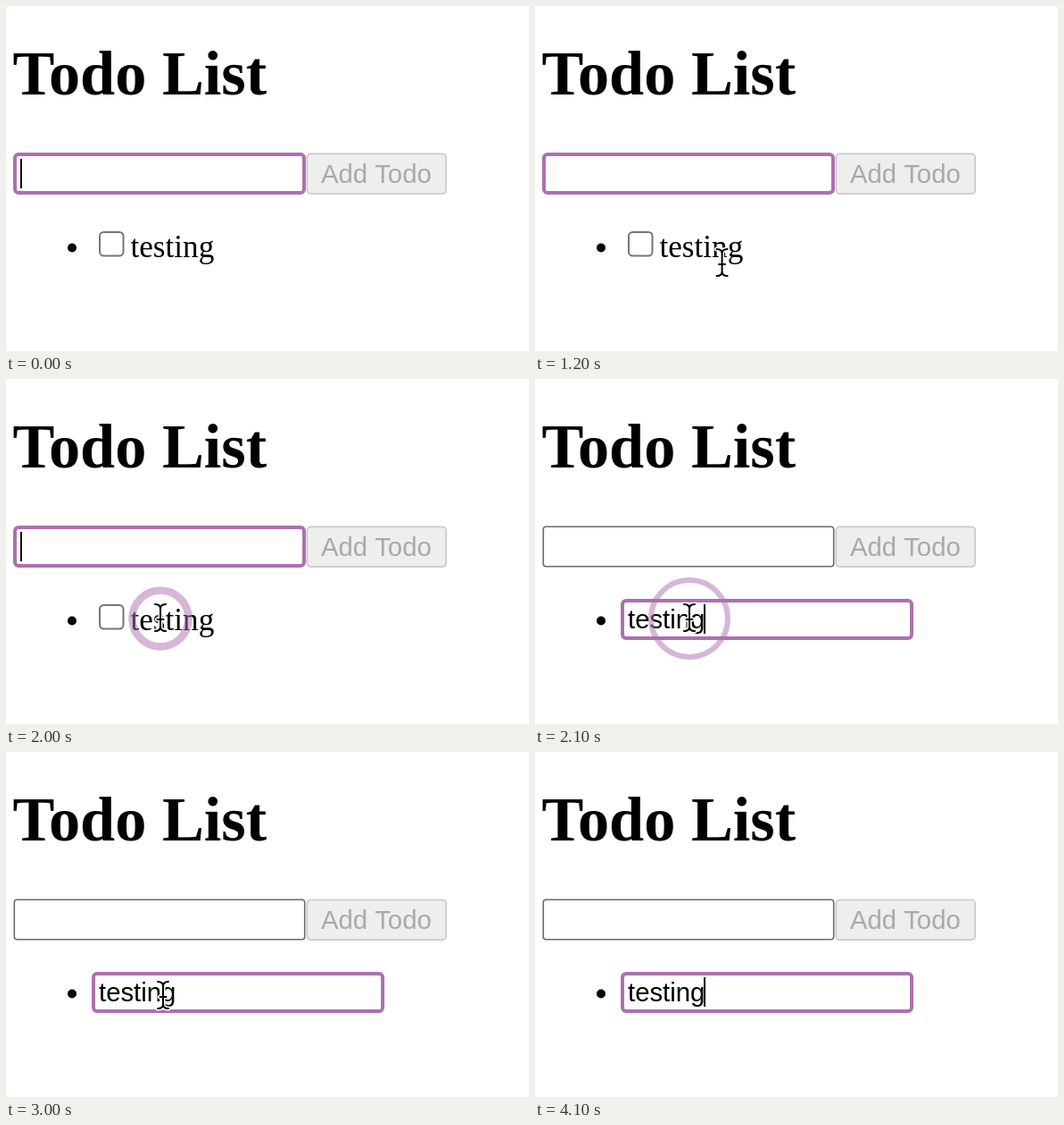
An HTML page with a canvas that plays this animation: 586x386 px, repeating every 4200 ms.

```html
<!DOCTYPE html>
<html lang="en">
<head>
<meta charset="utf-8">
<title>Todo List</title>
<style>
  html, body { margin: 0; width: 100%; height: 100%; overflow: hidden; background: #fff; }
  canvas { display: block; }
</style>
</head>
<body>
<canvas id="stage" width="586" height="386"></canvas>
<script>
const ctx = document.getElementById('stage').getContext('2d');
const LOOP = 4200, STEP = 100;
const ACCENT = '#ac70b0';
const SERIF = '"Liberation Serif", "Times New Roman", serif';
const SANS = '"Liberation Sans", Arial, sans-serif';
const REM = 35.15;
const HEADING = `bold ${REM * 2}px ${SERIF}`;
const BODY = `${REM}px ${SERIF}`;
const CONTROL = `${REM * 5 / 6}px ${SANS}`;
const REST = { x: 173, y: 267 };
const EDIT_AT = 2100;

function label(str, x, y, font, color = '#000') {
  ctx.font = font;
  ctx.fillStyle = color;
  ctx.fillText(str, x, y);
}

// Rounded box given by its outer edges, with the border drawn inside.
function box(x, y, w, h, r, line, border, fill = '#fff') {
  ctx.beginPath();
  ctx.roundRect(x + line / 2, y + line / 2, w - line, h - line, r);
  ctx.fillStyle = fill;
  ctx.fill();
  ctx.lineWidth = line;
  ctx.strokeStyle = border;
  ctx.stroke();
}

function field(x, y, w, h, focused) {
  if (focused) box(x, y, w, h, 4, 4, ACCENT);
  else box(x + 0.5, y + 0.5, w - 1, h - 1, 3, 1.6, '#6a6a6a');
}

function caret(x, y) {
  ctx.fillStyle = '#000';
  ctx.fillRect(x, y, 2, 33);
}

function dot(x, y, r) {
  ctx.beginPath();
  ctx.arc(x, y, r, 0, Math.PI * 2);
}

function outlined(path, x, y, outer, inner) {
  ctx.save();
  ctx.translate(x, y);
  ctx.lineJoin = ctx.lineCap = 'round';
  ctx.strokeStyle = '#fff';
  ctx.lineWidth = outer;
  ctx.stroke(path);
  if (inner) {
    ctx.strokeStyle = '#000';
    ctx.lineWidth = inner;
    ctx.stroke(path);
  } else {
    ctx.fillStyle = '#000';
    ctx.fill(path);
  }
  ctx.restore();
}

const beam = new Path2D('M-6-15Q0-15 0-10Q0-15 6-15M0-10V10M-6 15Q0 15 0 10Q0 15 6 15M-3.5 2H3.5');
const arrow = new Path2D('M0 0V25L6 19.5L10 29L14.5 27L10.5 18H18Z');

function pointer(t) {
  if (t < 900 || t >= 3400) return null;
  if (t < 1600) {
    const left = (1 - (t - 900) / 700) ** 2;
    return { x: REST.x + 112 * left, y: REST.y + 61 * left };
  }
  if (t < 3000) return REST;
  const u = (t - 3000) / 400;
  return { x: 176 + 30 * u, y: 272 + 116 * u ** 1.5 };
}

function drawPointer(t, editing) {
  const p = pointer(t);
  if (!p) return;
  const [left, right] = editing ? [96, 424] : [139, 233];
  const overText = p.x > left && p.x < right && p.y > 246 && p.y < 292;
  if (overText) outlined(beam, p.x, p.y, 5, 2);
  else outlined(arrow, p.x, p.y, 4);
}

function drawRing(t) {
  const age = t - 1900;
  if (age < 0 || age >= 500) return;
  ctx.save();
  ctx.globalAlpha = 0.5;
  ctx.strokeStyle = ACCENT;
  ctx.lineWidth = Math.max(1, 11 - age * 0.025);
  dot(REST.x, 268, 20 + age * 0.115);
  ctx.stroke();
  ctx.restore();
}

function draw(t) {
  const editing = t >= EDIT_AT;
  ctx.fillStyle = '#fff';
  ctx.fillRect(0, 0, 586, 386);

  label('Todo List', 7.5, 99, HEADING);
  field(8, 164, 328, 47, !editing);
  box(336.5, 164.5, 157.5, 46.5, 4, 1.8, '#cbcbcb', '#eeeeee');
  label('Add Todo', 353, 198, CONTROL, '#a9a9a9');

  ctx.fillStyle = '#000';
  dot(74, 270.5, 5);
  ctx.fill();

  if (editing) {
    field(96, 246, 328, 46, true);
    label('testing', 104, 279, CONTROL);
    if ((t - EDIT_AT) % 1000 < 500) caret(189, 252);
  } else {
    box(104, 252, 28.5, 28.5, 4.5, 2, '#767676');
    label('testing', 139.5, 281, BODY);
    const hidden = (t >= 200 && t < 700) || (t >= 1200 && t < 1600);
    if (!hidden) caret(16, 171);
  }

  drawRing(t);
  drawPointer(t, editing);
}

const start = performance.now();
function tick() {
  const t = (performance.now() - start) % LOOP;
  draw(Math.floor(t / STEP) * STEP);
  requestAnimationFrame(tick);
}
tick();
</script>
</body>
</html>
```
